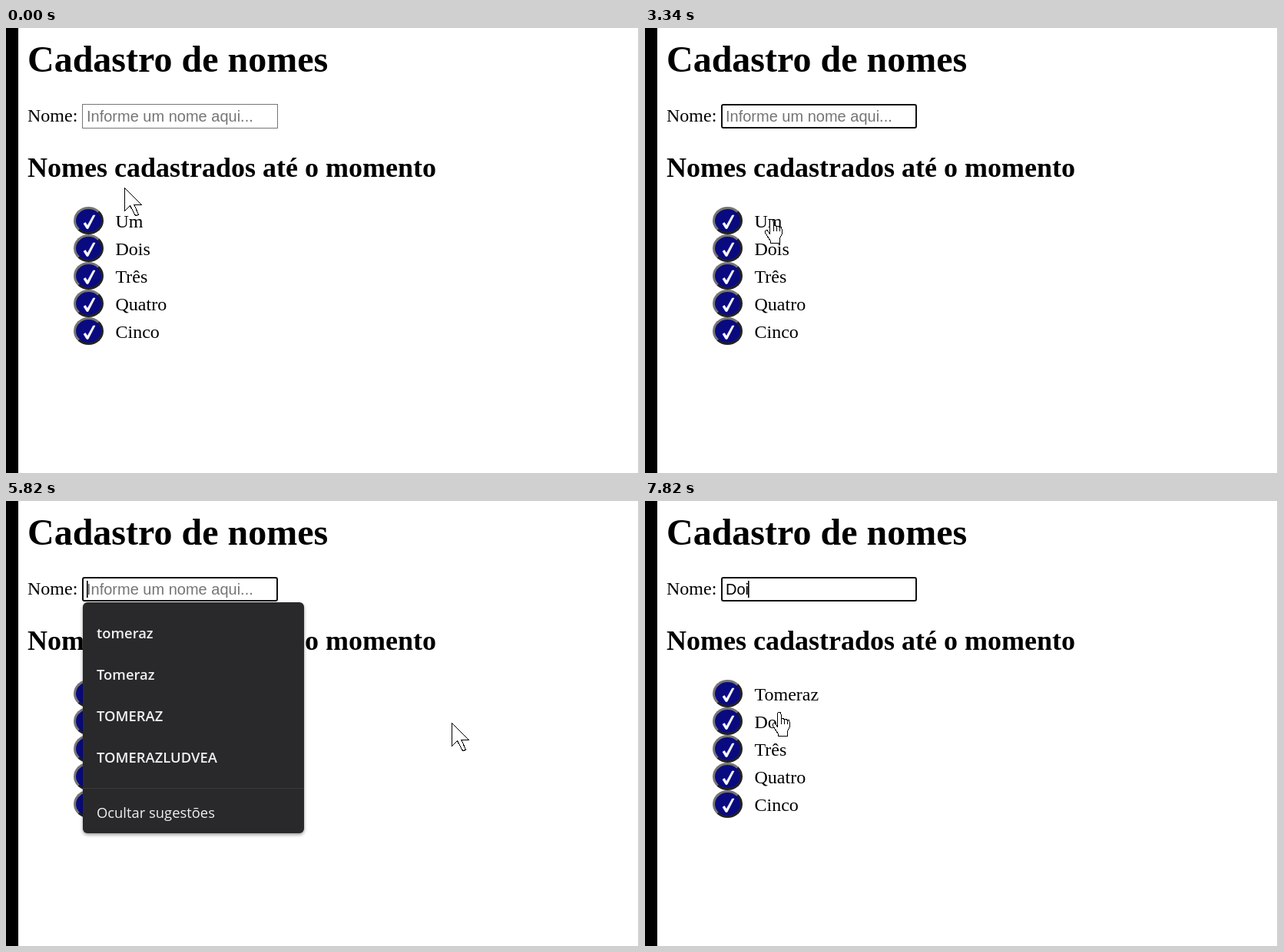
Animation, 824 px wide and 580 px high, one loop 8 s. Source, as an HTML page:

```html
<!DOCTYPE html>
<html lang="pt-BR">
<head>
<meta charset="utf-8">
<title>Cadastro de nomes</title>
<style>
  html, body { margin: 0; width: 100%; height: 100%; overflow: hidden; background: #fff; }
  svg { position: absolute; left: 0; top: 0; width: 824px; height: 580px; }
  .btn {
    position: absolute; left: 88px; width: 39px; height: 36px; box-sizing: border-box;
    border: 3px solid; border-color: #767676 #212121 #212121 #767676;
    border-radius: 50%; background: #0a0a80;
  }
  text { white-space: pre; }
  .page { font: 24px "Liberation Serif", serif; }
  .page .h1 { font-size: 48px; font-weight: bold; }
  .page .h2 { font-size: 36px; font-weight: bold; }
  .page path { fill: #fff; stroke: #fff; stroke-width: .6; }
  .input { font: 20px "Liberation Sans", sans-serif; }
  .popup { font: 600 18.4px "Open Sans", sans-serif; fill: #f0f0f2; }
  .popup .panel { fill: #29292b; filter: drop-shadow(0 2px 2px rgba(0, 0, 0, .4)); }
  .popup .hide { font-weight: 400; }
  .pointer path { fill: #fff; stroke: #000; stroke-width: 1; shape-rendering: crispEdges; }
</style>
</head>
<body>
<div id="buttons"></div>
<svg viewBox="0 0 824 580">
  <rect width="16" height="580"/>
  <rect x="823" width="1" height="580" fill="#c8c8c8"/>
  <g class="page">
    <text class="h1" x="28" y="57">Cadastro de nomes</text>
    <text x="28" y="122">Nome:</text>
    <text class="h2" x="28" y="194">Nomes cadastrados até o momento</text>
    <g id="rows"></g>
  </g>
  <g class="input">
    <rect id="box"/>
    <text id="value" x="105" y="122"></text>
    <rect id="caret" y="104" width="1.6" height="22"/>
  </g>
  <g class="popup" id="popup">
    <rect class="panel" x="100" y="132" width="288" height="301" rx="6"/>
    <rect id="active" x="100" y="198" width="288" height="54" fill="#4b4c4f"/>
    <rect x="100" y="374" width="288" height="1" fill="#39393b"/>
    <g id="options"></g>
    <text class="hide" x="118" y="413">Ocultar sugestões</text>
  </g>
  <g class="pointer" id="pointer">
    <path id="arrow" d="M.5.5V30.5L7.5 23.5L13.5 35L15 36.500L18 35.500V34L13 22.500H22.500Z"/>
    <path id="hand" d="M-.5 18V1.500Q-.5-.5 2-.5Q4-.5 4 1.500V9Q4 7 6 7Q8 7 8 9Q8 8 10 8Q12 8 12 10Q12 9.500 13 9.500Q15 9.500 15 12V19L12 25V30.500H0V27L-6.500 17Q-7 13-4 13.500ZM4 9V15M8 9V15M12 10V15"/>
    <circle id="click" r="18" fill="#ff0" fill-opacity=".5"/>
  </g>
</svg>
<script>
const LOOP = 8000, STEP = 76, HOLD = 230, BLINK = 500;
const NAME = 'Tomeraz';
const HINT = 'Informe um nome aqui...';
const OPEN = 3570, TYPE = 3740, ENTER = 4810, CLOSE = 5990;
const clicks = [540, 1570, CLOSE, 7250];
const $ = id => document.getElementById(id);

// Pointer strokes between resting points; swing sets the overshoot.
const home = { x: 154, y: 208 };
const strokes = [
  { from: 80, to: 240, x: 160, y: 236, swing: 1.7 },
  { from: 1170, to: 1400, x: 163, y: 250, swing: 1.7 },
  { from: 5210, to: 5820, x: 580, y: 289, swing: 1.7 },
  { from: 6220, to: 6370, x: 272, y: 214, swing: 0 },
  { from: 6540, to: 7100, x: 173, y: 276, swing: 0 }
];

function ease(p, swing) {
  const q = p * p * (3 - 2 * p) - 1;
  return 1 + (swing + 1) * q ** 3 + swing * q ** 2;
}

function pointerAt(t) {
  let { x, y } = home;
  for (const s of strokes) {
    if (t < s.from) break;
    const gaps = Math.round((s.to - s.from) / STEP);
    const done = Math.floor((t - s.from) / (s.to - s.from) * gaps) + 1;
    const k = ease(Math.min(1, done / (gaps + 1)), s.swing);
    x += (s.x - x) * k;
    y += (s.y - y) * k;
  }
  return { x: Math.round(x), y: Math.round(y) };
}

// Field history; null means the field has no focus.
const edits = [];
const edit = (time, text) => edits.push({ time, text });
const erase = (time, word, count, gap) => {
  for (let i = 0; i < count; i++) edit(time + i * gap, word.slice(0, -1 - i));
};
const type = (time, word, gap) => {
  for (let i = 0; i < word.length; i++) edit(time + i * gap, word.slice(0, i + 1));
};
edit(0, null);
edit(clicks[1] + HOLD, 'Um');
erase(2480, 'Um', 2, 330);
edit(OPEN, NAME);
type(TYPE, NAME, 110);
edit(ENTER, '');
edit(CLOSE, null);
edit(clicks[3] + HOLD, 'Dois');
erase(7820, 'Dois', 1, 0);

const within = (t, from, to) => t >= from && t < to;
const show = (id, on) => $(id).setAttribute('visibility', on ? 'inherit' : 'hidden');
const set = (id, attrs) => {
  for (const key in attrs) $(id).setAttribute(key, attrs[key]);
};

const names = ['Um', 'Dois', 'Três', 'Quatro', 'Cinco'];
const upper = NAME.toUpperCase();
$('buttons').innerHTML = names.map((_, i) =>
  `<div class="btn" style="top:${233 + 36 * i}px"></div>`).join('');
$('rows').innerHTML = names.map((name, i) =>
  `<g transform="translate(0 ${36 * i})">
    <path d="M101 255L103.500 253.500L106 257.500L113.500 244H116L107 261.500H105Z"/>
    <text x="142.500" y="260">${name}</text>
  </g>`).join('');
$('options').innerHTML = [NAME.toLowerCase(), NAME, upper, upper + 'LUDVEA']
  .map((name, i) => `<text x="118" y="${179 + 54 * i}">${name}</text>`).join('');
const firstName = $('rows').querySelector('text');

function drawInput(t) {
  const { time, text } = edits.findLast(e => e.time <= t);
  const focused = text !== null;
  const preview = within(t, OPEN, TYPE);
  const value = $('value');
  set('box', focused
    ? { x: 100, y: 100, width: 253, height: 30, rx: 2, stroke: '#101010', 'stroke-width': 2 }
    : { x: 99.5, y: 99.5, width: 254, height: 31, rx: 0, stroke: '#767676', 'stroke-width': 1 });
  set('box', { fill: preview ? '#e8f0fe' : '#fff' });
  value.textContent = text || HINT;
  set('value', { fill: text ? '#000' : '#757575' });
  set('caret', { x: 105 + (text ? Math.floor(value.getComputedTextLength() - 1) : 0) });
  show('caret', focused && !preview && (t - time) % (2 * BLINK) < BLINK);
  show('active', preview);
}

function drawPointer(t, open) {
  const { x, y } = pointerAt(t);
  const overName = !open && y > 233 && x < 228;
  set('pointer', { transform: `translate(${x} ${y})` });
  show('hand', overName);
  show('arrow', !overName);
  show('click', clicks.some(c => within(t, c, c + HOLD)));
}

function draw(t) {
  const open = within(t, OPEN, CLOSE);
  show('popup', open);
  firstName.textContent = t < ENTER ? names[0] : NAME;
  drawInput(t);
  drawPointer(t, open);
}

const start = performance.now();
function tick() {
  draw((performance.now() - start) % LOOP);
  requestAnimationFrame(tick);
}
tick();
</script>
</body>
</html>
```
